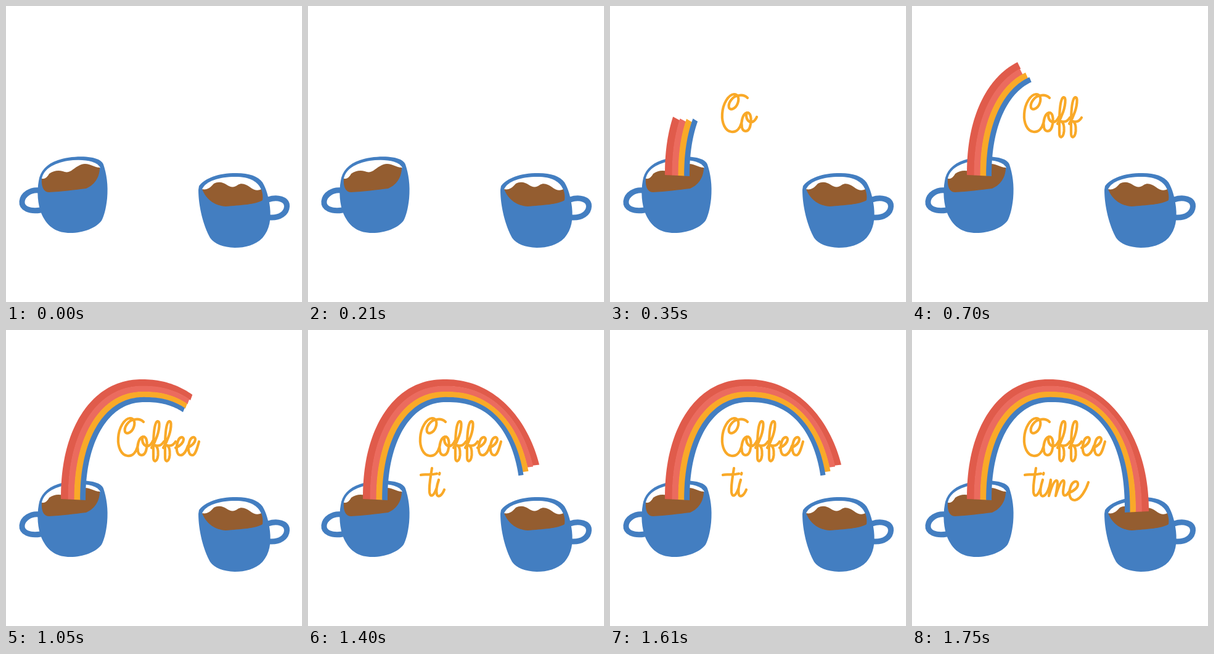
These frames come from a looping animation (480 by 480 pixels, 2100 ms). An HTML page with a canvas:

```html
<!DOCTYPE html>
<html lang="en">
<head>
<meta charset="utf-8">
<title>Coffee time</title>
<style>
  html, body { margin: 0; width: 100%; height: 100%; overflow: hidden; background: #fff; }
  canvas { display: block; width: 100vmin; height: 100vmin; }
</style>
</head>
<body>
<canvas id="stage" width="480" height="480" role="img" aria-label="Coffee time"></canvas>
<script>
const ctx = document.getElementById('stage').getContext('2d');
const STEP = 350, STEPS = 6;
const BLUE = '#437ec1', BROWN = '#945d30', YELLOW = '#f9a928', WHITE = '#fff';

const cups = [
  {
    handle: 'M54 299C40 297 27 306 26 317C25 328 38 334 56 331',
    body: 'M158 257C163 272 166 290 164 312C162 330 159 340 155 348C146 360 126 368 104 368C84 368 68 360 58 338C51 322 50 300 53 284C55 268 66 256 84 250C104 243 135 242 150 249C154 251 157 254 158 257Z',
    foam: 'M58 280C61 264 78 255 100 251C122 248 146 250 153 262C140 272 80 285 58 280Z',
    coffee: 'M58 280C64 281 67 277 70 272C77 267 85 266 92 268C97 270 101 270 106 267C113 262 120 256 128 256C138 256 143 262 152 262C152 275 146 289 130 296C112 298 90 301 70 302C62 302 57 295 58 280Z'
  },
  {
    handle: 'M425 314C440 309 456 313 455.5 325C455 336 444 344 428 343',
    body: 'M313 292C320 282 338 272 368 271C392 270 408 275 416 286C422 296 426 310 428 326C430 345 428 362 416 376C404 388 388 392 371 392C352 391 338 386 331 376C320 356 312 325 312 298Z',
    foam: 'M318 297C324 284 345 277 372 277C395 277 408 284 414 298C400 310 330 310 318 297Z',
    coffee: 'M318 297C326 299 332 294 337 288C345 284 352 286 358 290C365 295 371 294 376 290C383 286 390 290 396 294C402 299 409 300 414 297C416 303 417 309 416 315C405 322 380 323 356 325C340 324 325 315 318 297Z'
  }
];

// Bands run from the outer edge (0) to the inner edge (1); ends are arch angles per step.
const bands = [
  { color: '#e05b4b', from: 0, to: 0.29, ends: [0, 0.47, 1.215, 2.07, 2.80, Math.PI] },
  { color: '#eb6b5e', from: 0.29, to: 0.54, ends: [0, 0.487, 1.205, 2.055, 2.81, Math.PI] },
  { color: YELLOW, from: 0.54, to: 0.78, ends: [0, 0.515, 1.25, 2.05, 2.843, Math.PI] },
  { color: BLUE, from: 0.78, to: 1, ends: [0, 0.555, 1.275, 2.04, 2.87, Math.PI] }
];

const F = 'M236 191C243 180 249 164 248.500 152C248 146 244 147 242 154C238 168 239 190 239 207C239 215 245 215 246.500 203C247 195 246 189 242 187C248 189 253 186 256 181';
const E = 'M275 191C283 188 288 182 288 177C287.500 172 281 173 278.500 181C275 192 277 203 283 203C288 203 292 197 295 188';

// Handwritten strokes: [path, step of appearance, x shift]
const letters = [
  ['M213 190C210 200 204 205 197 204C187 203 181 190 182 175C183 158 192 144 201 143C208 143 210 150 207 158C204 166 196 170 193 165C191 158 198 146 209 145C215 144 220 146 223 149', 1, 0],
  ['M222 173C215 175 212 188 214 197C216 205 224 205 227 196C230 187 229 175 224 173C220 173 220 181 224 186C229 191 235 187 238 180', 1, 0],
  [F, 2, 0],
  [F, 2, 19],
  [E, 3, 0],
  ['M275 191C283 188 288 182 288 177C287.500 172 281 173 278.500 181C275 192 277 203 283 203C288 203 291 192 294 181', 3, 19],
  ['M201 224C199 238 196 250 197 263C198 271 203 271 208 258M183 235C190 233 196 236 209 233', 4, 0],
  ['M212 243C209 252 207 261 209 267C211 272 217 269 221 259M213.500 232L213 234', 4, 0],
  ['M221 259C224 252 224 247 225 243C225 252 223 262 222 269C226 255 230 245 234 244C238 244 235 257 233 269C237 256 241 245 245 244C249 244 245 256 245 263C245 271 251 269 254 263', 5, 0],
  ['M254 264C263 261 270 255 269 249C268 243 260 245 257 255C253 266 256 276 264 276C273 275 282 260 286 247', 5, 0]
].map(([d, step, shift]) => ({ path: new Path2D(d), step, shift }));

for (const cup of cups)
  for (const part in cup) cup[part] = new Path2D(cup[part]);

const mix = (a, b, k) => a + (b - a) * k;

// Superellipse arch, angle 0 at the left foot and PI at the right foot.
function archPoint(k, angle) {
  const left = angle < Math.PI / 2;
  const topX = mix(222, 225, k), topY = mix(80, 117, k);
  const footX = left ? mix(89, 129, k) : mix(384, 345, k);
  const footY = left ? mix(274, 276, k) : mix(294, 296, k);
  const power = 2 / (left ? 2.2 : mix(2.1, 2.4, k));
  const across = Math.abs(Math.cos(angle)) ** power;
  const up = Math.max(0, Math.sin(angle)) ** power;
  return [topX + (footX - topX) * across, footY - (footY - topY) * up];
}

function drawBand({ color, from, to, ends }, step) {
  const end = ends[step], count = 90;
  const inner = Math.min(1, to + 0.015);
  ctx.beginPath();
  for (let i = 0; i <= count; i++) ctx.lineTo(...archPoint(from, end * i / count));
  for (let i = count; i >= 0; i--) ctx.lineTo(...archPoint(inner, end * i / count));
  ctx.fillStyle = color;
  ctx.fill();
}

function fill(path, color) {
  ctx.fillStyle = color;
  ctx.fill(path);
}

function drawCup({ handle, body, foam, coffee }) {
  ctx.strokeStyle = BLUE;
  ctx.lineWidth = 9;
  ctx.stroke(handle);
  fill(body, BLUE);
  fill(foam, WHITE);
  fill(coffee, BROWN);
}

function drawLetter({ path, shift }) {
  ctx.save();
  ctx.translate(shift, 0);
  ctx.strokeStyle = YELLOW;
  ctx.lineWidth = 4.2;
  ctx.stroke(path);
  ctx.restore();
}

function draw(time) {
  const step = Math.floor(time / STEP) % STEPS;
  ctx.fillStyle = WHITE;
  ctx.fillRect(0, 0, 480, 480);
  cups.forEach(drawCup);
  if (step > 0) bands.forEach(band => drawBand(band, step));
  letters.filter(letter => letter.step <= step).forEach(drawLetter);
}

ctx.lineCap = ctx.lineJoin = 'round';
let start;
function tick(now) {
  start ??= now;
  draw(now - start);
  requestAnimationFrame(tick);
}
draw(0);
requestAnimationFrame(tick);
</script>
</body>
</html>
```
